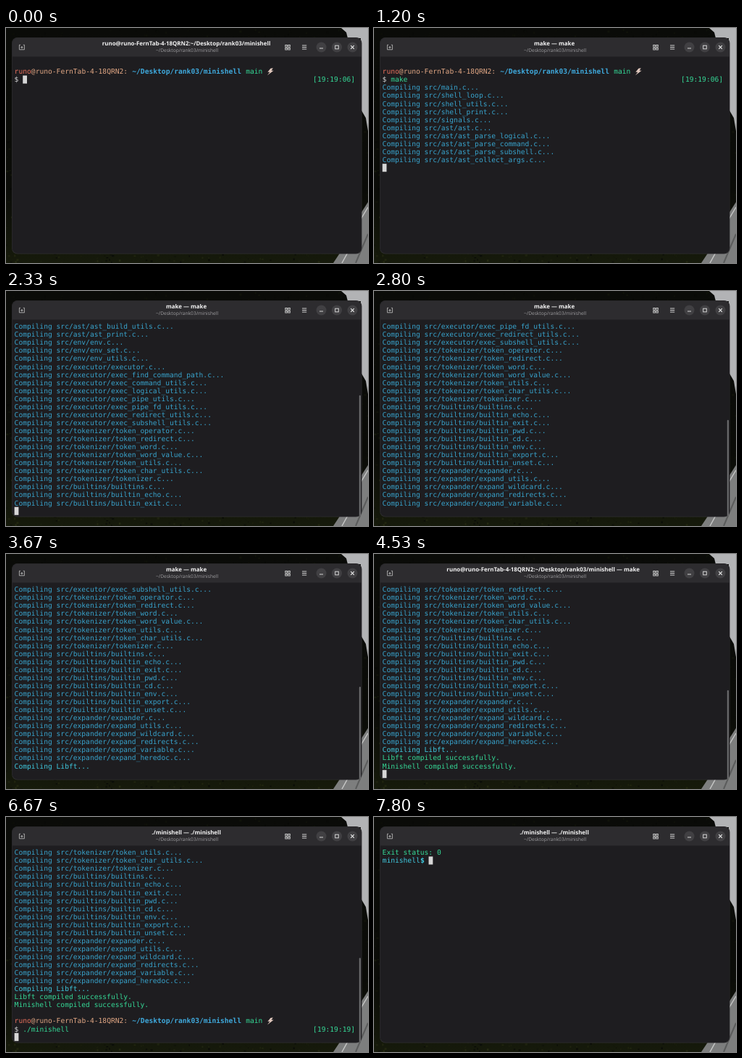
These frames come from a looping animation (500x324 px, 8000 ms). An HTML page with a canvas:

```html
<!DOCTYPE html>
<html lang="en">
<head>
<meta charset="utf-8">
<title>Terminal</title>
<style>
  html, body { margin: 0; width: 100%; height: 100%; overflow: hidden; background: #0b0c08; }
  canvas { display: block; width: 500px; height: 324px; }
</style>
</head>
<body>
<canvas id="stage"></canvas>
<script>
const W = 500, H = 324, LOOP = 8000, STEP = 1000 / 15;
const ROWS = 24, COL = 5.81, ROW = 11.06, LEFT = 11.6, TOP = 43.4;
const MONO = '"DejaVu Sans Mono", monospace';
const SANS = '"Noto Sans", "Open Sans", sans-serif';
const C = {
  body: '#1e1d20', head: '#2d2c2f', text: '#d4d4d4', dim: '#6f7880', build: '#38a3cc',
  cyan: '#3fc8de', green: '#35d896', red: '#e8705c', peach: '#e0a683', path: '#3fa9dc'
};
const USER = 'runo', HOST = 'runo-FernTab-4-18QRN2', DIR = '~/Desktop/rank03/minishell';
const HOME_TITLE = `${USER}@${HOST}:${DIR}`;

const sources = [
  ['', 'main shell_loop shell_utils shell_print signals'],
  ['ast/', 'ast ast_parse_logical ast_parse_command ast_parse_subshell ast_collect_args ' +
    'ast_parse_redirects ast_parse_redirects_utils ast_build_utils ast_print'],
  ['env/', 'env env_set env_utils'],
  ['executor/', 'executor exec_find_command_path exec_command_utils exec_logical_utils ' +
    'exec_pipe_utils exec_pipe_fd_utils exec_redirect_utils exec_subshell_utils'],
  ['tokenizer/', 'token_operator token_redirect token_word token_word_value token_utils ' +
    'token_char_utils tokenizer'],
  ['builtins/', 'builtins builtin_echo builtin_exit builtin_pwd builtin_cd builtin_env ' +
    'builtin_export builtin_unset'],
  ['expander/', 'expander expand_utils expand_wildcard expand_redirects expand_variable expand_heredoc']
].flatMap(([dir, names]) => names.split(' ').map(name => `Compiling src/${dir}${name}.c...`));

// Key times, one per typed character.
const makeKeys = [70, 130, 270, 400];
const runKeys = [5070, 5270, 5330, 5470, 5530, 5670, 5930, 6070, 6130, 6330, 6470];
const clearKeys = [7130, 7330, 7470, 7530, 7670];
const MAKE = 670, RUN = 6670, CLEARED = 7800;
const keys = [0, ...makeKeys, MAKE, ...runKeys, RUN, ...clearKeys, CLEARED];
const pressed = (list, t) => list.filter(k => k <= t + 5).length;

// Compiled files by tick: [tick, count].
const pace = [[10, 0], [18, 10], [29, 27], [42, 45], [43, 46]];
function compiled(tick) {
  for (let i = 1; i < pace.length; i++) {
    const [a, m] = pace[i - 1], [b, n] = pace[i];
    if (tick <= b) return Math.max(0, Math.floor(m + (n - m) * (tick - a) / (b - a) + 1e-6));
  }
  return sources.length;
}

const canvas = document.getElementById('stage');
const ctx = canvas.getContext('2d');
const dpr = window.devicePixelRatio || 1;
canvas.width = W * dpr;
canvas.height = H * dpr;

function box(x, y, w, h, r, color) {
  ctx.fillStyle = color;
  ctx.beginPath();
  ctx.roundRect(x, y, w, h, r);
  ctx.fill();
}
function poly(points, color) {
  ctx.fillStyle = color;
  ctx.beginPath();
  points.forEach(([x, y]) => ctx.lineTo(x, y));
  ctx.fill();
}
function line(points, color = '#d4d4d4', width = 1) {
  ctx.strokeStyle = color;
  ctx.lineWidth = width;
  ctx.beginPath();
  points.forEach(([x, y], i) => i ? ctx.lineTo(x, y) : ctx.moveTo(x, y));
  ctx.stroke();
}

// A line is a list of [column, text, colour, bold, underline]; a blank colour marks the bolt.
const plain = (text, color) => [[0, text, color]];
const prompt = [
  [0, USER, C.red], [4, '@' + HOST + ':', C.peach],
  [28, DIR, C.path, true], [55, 'main', C.green], [60, '']
];

function command(text, typed, clock, valid) {
  const left = text.slice(0, typed), isPath = text[0] === '.';
  const color = valid ? C.green : isPath ? C.text : C.red;
  const segs = [[0, '$', C.text], [2, left, color, false, isPath && !valid]];
  if (typed) segs.push([2 + typed, text.slice(typed), C.dim]);
  segs.push([71, clock, C.green]);
  return segs;
}
const shellPrompt = text => [[0, 'minishell', C.cyan], [9, '$', C.cyan, true], [11, text, C.text]];

function state(t) {
  const tick = Math.floor((t + 5) / STEP);
  if (t >= CLEARED - 5) {
    return {
      lines: [plain('Exit status: 0', C.green), shellPrompt('')],
      col: 11, under: '', title: './minishell — ./minishell'
    };
  }
  const typed = pressed(makeKeys, t);
  const lines = [[], prompt, command('make', typed, '[19:19:06]', typed === 4)];
  if (t < MAKE - 5) {
    return { lines, col: 2 + typed, under: typed ? 'make'[typed] : '', title: HOME_TITLE };
  }
  sources.slice(0, compiled(tick)).forEach(s => lines.push(plain(s, C.build)));
  if (tick >= 44) lines.push(plain('Compiling Libft...', C.cyan));
  if (t >= 4465) lines.push(plain('Libft compiled successfully.', C.green));
  if (t >= 4525) lines.push(plain('Minishell compiled successfully.', C.green));

  let title = 'make — make';
  if (t >= 4525) title = HOME_TITLE + ' — make';
  if (t >= 4925) title = HOME_TITLE;
  if (t >= RUN - 5) title = './minishell — ./minishell';

  if (t < 4665) {
    lines.push([]);
    return { lines, col: 0, under: '', title };
  }
  const run = './minishell', n = pressed(runKeys, t);
  lines.push([], prompt, command(run, n, '[19:19:19]', t >= 6525));
  if (t < RUN - 5) return { lines, col: 2 + n, under: n ? run[n] || '' : '', title };

  if (t < 6725) {
    lines.push([]);
    return { lines, col: 0, under: '', title };
  }
  const c = pressed(clearKeys, t);
  lines.push(shellPrompt('clear'.slice(0, c)));
  return { lines, col: 11 + c, under: '', title };
}

function drawLine(segs, row) {
  const y = TOP + row * ROW + 8.8;
  for (const [col, text, color, bold, under] of segs) {
    const x = LEFT + col * COL;
    if (!color) {
      poly([[x + 8.6, y - 8], [x + 5.2, y - 7.4], [x + 1.2, y - 2.4], [x + 4.2, y - 2.6],
        [x + 0.8, y + 2], [x + 9.4, y - 4.6], [x + 6.4, y - 4.6]], '#e2c9be');
      continue;
    }
    ctx.font = `${bold ? 'bold ' : ''}9.65px ${MONO}`;
    ctx.fillStyle = color;
    ctx.fillText(text, x, y);
    if (under) ctx.fillRect(x, y + 1.2, text.length * COL, 0.8);
  }
}

// Dark forest behind the window, pale sky at the upper right, a road at the lower right.
function drawBackdrop() {
  const g = ctx.createLinearGradient(0, 0, 0, H);
  g.addColorStop(0, '#0a0b08');
  g.addColorStop(0.7, '#0b0c08');
  g.addColorStop(1, '#161a0b');
  ctx.fillStyle = g;
  ctx.fillRect(0, 0, W, H);

  let seed = 7;
  const rnd = () => (seed = seed * 16807 % 2147483647) / 2147483647;
  for (let i = 0; i < 1600; i++) {
    const x = rnd() * W, y = rnd() * H, v = rnd() * (8 + 20 * y / H);
    ctx.fillStyle = `rgb(${8 + v}, ${9 + v * 1.15}, ${7 + v * 0.35})`;
    ctx.fillRect(x, y, 1 + rnd() * 2.5, 1 + rnd() * 2);
  }
  poly([[463, 0], [500, 0], [500, 142], [497, 124], [490, 112], [490, 14], [472, 14], [470, 6]], '#b2b3b5');
  poly([[500, 240], [491, 254], [476, 288], [452, 324], [500, 324]], '#7d7e7e');
  line([[500, 247], [491, 262], [474, 306], [464, 324]], '#c9cac9', 1.4);
  line([[500, 284], [483, 324]], '#5b5c5c', 2);
}

function drawHeader(title) {
  line([[20, 23.3], [18.4, 23.3], [18.4, 29.8], [25.4, 29.8], [25.4, 23.3], [23.8, 23.3]], '#c4c4c4', 0.8);
  line([[21.9, 25], [21.9, 28.4]], '#c4c4c4', 0.8);
  line([[20.2, 26.7], [23.6, 26.7]], '#c4c4c4', 0.8);
  for (const x of [385.8, 389.8]) {
    for (const y of [23.5, 27.5]) {
      ctx.strokeStyle = '#d4d4d4';
      ctx.lineWidth = 0.9;
      ctx.strokeRect(x, y, 2.5, 2.5);
    }
  }
  for (const y of [24, 26.5, 29]) line([[409, y], [415.2, y]]);
  for (const x of [435.5, 457, 478.5]) box(x - 7, 19.5, 14, 14, 7, '#414043');
  line([[433, 28], [438, 28]]);
  ctx.strokeRect(454.7, 24.2, 4.6, 4.6);
  line([[476.2, 24.2], [480.8, 28.8]], '#eee', 1.1);
  line([[480.8, 24.2], [476.2, 28.8]], '#eee', 1.1);

  ctx.font = `bold 7.9px ${SANS}`;
  const w = ctx.measureText(title).width;
  ctx.fillStyle = '#f4f4f4';
  ctx.fillText(title, Math.min(249 - w / 2, 367 - w), 24);
  ctx.font = `6.6px ${SANS}`;
  ctx.fillStyle = '#98979a';
  ctx.fillText(DIR, 250 - ctx.measureText(DIR).width / 2, 33);
}

function draw(t) {
  ctx.setTransform(dpr, 0, 0, dpr, 0, 0);
  ctx.textRendering = 'geometricPrecision';
  drawBackdrop();
  box(8, 13, 483.5, 298.5, 8, '#302f32');
  box(8.6, 13.6, 482.3, 297.2, 7.5, C.body);
  box(8.6, 13.6, 482.3, 26, [7.5, 7.5, 0, 0], C.head);

  const { lines, col, under, title } = state(t);
  drawHeader(title);
  const first = Math.max(0, lines.length - ROWS);
  lines.slice(first).forEach(drawLine);

  const lastKey = keys.filter(k => k <= t + 5).pop();
  if (Math.floor((t + 5 - lastKey) / 600) % 2 === 0) {
    const row = lines.length - 1 - first;
    box(LEFT + col * COL, TOP + row * ROW, COL, ROW, 0, '#d6d6d6');
    if (under) drawLine([[col, under, C.body]], row);
  }
  if (first) {
    const h = 270 * ROWS / lines.length;
    box(487.8, 310 - h, 2.2, h, 1, '#69696b');
  }
}

function frame() {
  draw(performance.now() % LOOP);
  requestAnimationFrame(frame);
}
frame();
</script>
</body>
</html>
```
